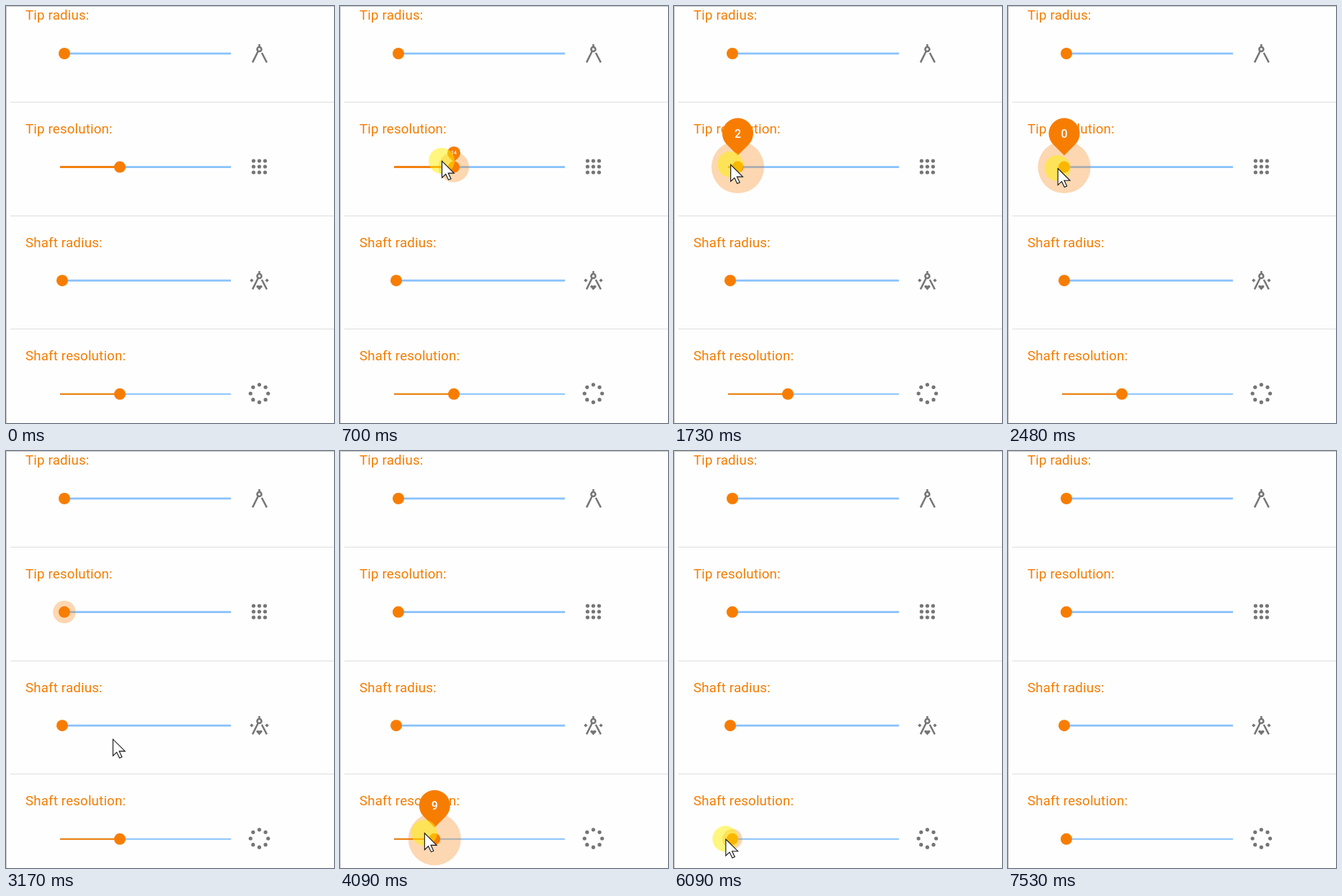
Recreate the animation shown at these times as an HTML page. Size 455 px wide and 579 px high, loop 8.12 s.

```html
<!DOCTYPE html>
<html lang="en">
<head>
<meta charset="utf-8">
<title>Sliders</title>
<style>
  html, body { margin: 0; width: 100%; height: 100%; overflow: hidden; background: #fefefe; }
  svg { display: block; width: 455px; height: 579px; }
  .label { font: 400 18.67px Roboto, sans-serif; letter-spacing: .01em; fill: #f57c00; }
  .value { font: 500 16px Roboto, sans-serif; fill: #fff; text-anchor: middle; }
  .accent { fill: #f77d00; }
  .track { fill: #8ac2fb; }
  .halo { fill: #f57c00; fill-opacity: .3; }
  .icon { fill: #757575; }
  .line { fill: none; stroke: #757575; stroke-width: 2.5; }
</style>
</head>
<body>
<svg viewBox="0 0 455 579">
  <g id="rows"></g>
  <g id="pins"></g>
  <path d="M0.5 579V0.5H455" fill="none" stroke="#c4c4c4"/>
  <g id="pointer">
    <circle id="glow" r="18" fill="#fff000" fill-opacity=".5"/>
    <path d="M.5 .5V23.5L5.7 18.6L9.6 26.5L13 25L9.2 17.2H17.3Z" fill="#fff" stroke="#111" stroke-width="1.1"/>
  </g>
</svg>
<script>
const LOOP = 8120, LEFT = 75, WIDTH = 237, MAX = 40, STEP = WIDTH / MAX;
const START = LEFT + 14 * STEP, HALO = 36.5, ICON_X = 351.4;

// Each drag runs from the start value to 0, then settles on 1.
const tipDrag = { press: 600, from: 880, to: 2050, snap: 2340, settle: 2620, release: 2960, leave: 2960 };
const shaftDrag = { press: 3750, from: 3815, to: 4955, snap: 5360, settle: 5590, release: 5860, leave: 7170 };

const rows = [
  { text: 'Tip radius:', x: 81, bar: 2.8, icon: compass },
  { text: 'Tip resolution:', drag: tipDrag, bar: 2.8, icon: grid },
  { text: 'Shaft radius:', x: 78, bar: 2.8, icon: compassWithMarks },
  { text: 'Shaft resolution:', drag: shaftDrag, bar: 2, icon: ring }
];

const byId = id => document.getElementById(id);
const clamp = p => Math.min(1, Math.max(0, p));
const ramp = (t, a, b) => clamp((t - a) / (b - a));
const easeOut = p => 1 - (1 - p) ** 1.4;

function dot(x, y) { return `<circle class="icon" cx="${x}" cy="${y}" r="2.6"/>`; }
function diamond(x) { return `<path class="icon" d="M${x - 2.6} 0l2.6 -2.6l2.6 2.6l-2.6 2.6z"/>`; }
function compass() {
  return '<g class="line" transform="translate(0 -6)"><circle r="3"/>' +
    '<path d="M0 -3V-7M-1.8 3L-9.4 18.4M3.4 5L10.4 18.4"/></g>';
}
function compassWithMarks() {
  return compass() + diamond(-10.6) + diamond(10.6) +
    '<path class="icon" d="M0 13.5L-4.2 9Q-4 5.4 0 7.6Q4 5.4 4.2 9Z"/>';
}
function grid() {
  let out = '';
  for (let i = 0; i < 9; i++) out += dot((i % 3 - 1) * 8, (Math.floor(i / 3) - 1) * 8);
  return out;
}
function ring() {
  let out = '';
  for (let i = 0; i < 8; i++) {
    const a = i * Math.PI / 4;
    out += dot(12.2 * Math.cos(a), 12.2 * Math.sin(a));
  }
  return out;
}

function build(row, i) {
  row.y = 66 + 157.6 * i;
  const bar = (cls, w) =>
    `<rect class="${cls}" x="${LEFT}" y="${row.y - row.bar / 2}" width="${w}" height="${row.bar}"/>`;
  byId('rows').insertAdjacentHTML('beforeend', `<g>
    <text class="label" x="27" y="${Math.round(row.y - 46.7)}">${row.text}</text>
    ${bar('track', WIDTH)}${bar('accent fill', 0)}
    <circle class="halo" cy="${row.y}" r="0"/>
    <circle class="accent thumb" cy="${row.y}" r="8"/>
    <g transform="translate(${ICON_X} ${Math.floor(row.y)})">${row.icon()}</g>
    <rect x="6" y="${Math.round(row.y + 67.2)}" width="449" height="1" fill="#dedede"/>
  </g>`);
  const g = byId('rows').lastElementChild;
  row.fill = g.querySelector('.fill');
  row.halo = g.querySelector('.halo');
  row.thumb = g.querySelector('.thumb');
  if (!row.drag) return;
  byId('pins').insertAdjacentHTML('beforeend', `<g>
    <path class="accent" d="M0 -16.1L-15.2 -31.3A21.5 21.5 0 1 1 15.2 -31.3Z"/>
    <text class="value" y="-41"></text>
  </g>`);
  row.sign = byId('pins').lastElementChild;
  row.value = row.sign.querySelector('text');
}

function thumbX({ drag, x }, t) {
  if (!drag) return x;
  return START + (LEFT - START) * easeOut(ramp(t, drag.from, drag.to)) +
    STEP * ramp(t, drag.snap, drag.settle);
}

function haloRadius({ press, release }, t) {
  const shrink = ramp(t, release, release + 320);
  if (shrink === 1) return 0;
  return HALO * easeOut(ramp(t, press, press + 220)) - (HALO - 5) * shrink;
}

function pinScale({ press, release }, t) {
  return easeOut(ramp(t, press + 20, press + 270)) * (1 - ramp(t, release, release + 190));
}

function drawRow(row, t) {
  const x = thumbX(row, t);
  row.thumb.setAttribute('cx', x);
  row.fill.setAttribute('width', x - LEFT);
  if (!row.drag) return;
  row.halo.setAttribute('cx', x);
  row.halo.setAttribute('r', haloRadius(row.drag, t));
  row.sign.setAttribute('transform', `translate(${x} ${row.y}) scale(${pinScale(row.drag, t)})`);
  row.value.textContent = Math.floor((x - LEFT) / STEP + .4);
}

// The pointer sits up and left of the thumb and drifts closer along the drag.
function hold(row, t) {
  const x = thumbX(row, t), p = (START - x) / (START - LEFT);
  return [x - 17 + 8 * p, row.y - 8.7 + 12.2 * p ** 5];
}

function curve(a, via, b, time) {
  const p = easeOut(time), q = 1 - p;
  return a.map((v, i) => v * q * q + 2 * via[i] * p * q + b[i] * p * p);
}

function pointerAt(t) {
  const tip = rows[1], shaft = rows[3];
  if (t < tipDrag.press) return curve([384, 582], [200, 260], hold(tip, t), ramp(t, 20, tipDrag.press));
  if (t < tipDrag.leave) return hold(tip, t);
  if (t < shaftDrag.press) {
    return curve(hold(tip, t), [220, 526], hold(shaft, t), ramp(t, tipDrag.leave, shaftDrag.press));
  }
  if (t < shaftDrag.leave) return hold(shaft, t);
  return curve(hold(shaft, t), [150, 560], [262, 582], ramp(t, shaftDrag.leave, 7530));
}

function glowAt(t) {
  const level = d => ramp(t, d.press - 30, d.press + 30) - ramp(t, d.leave, d.leave + 80);
  return level(tipDrag) + level(shaftDrag);
}

function draw() {
  const t = performance.now() % LOOP;
  rows.forEach(row => drawRow(row, t));
  byId('pointer').setAttribute('transform', `translate(${pointerAt(t)})`);
  byId('glow').setAttribute('opacity', glowAt(t));
  requestAnimationFrame(draw);
}

rows.forEach(build);
draw();
</script>
</body>
</html>
```
